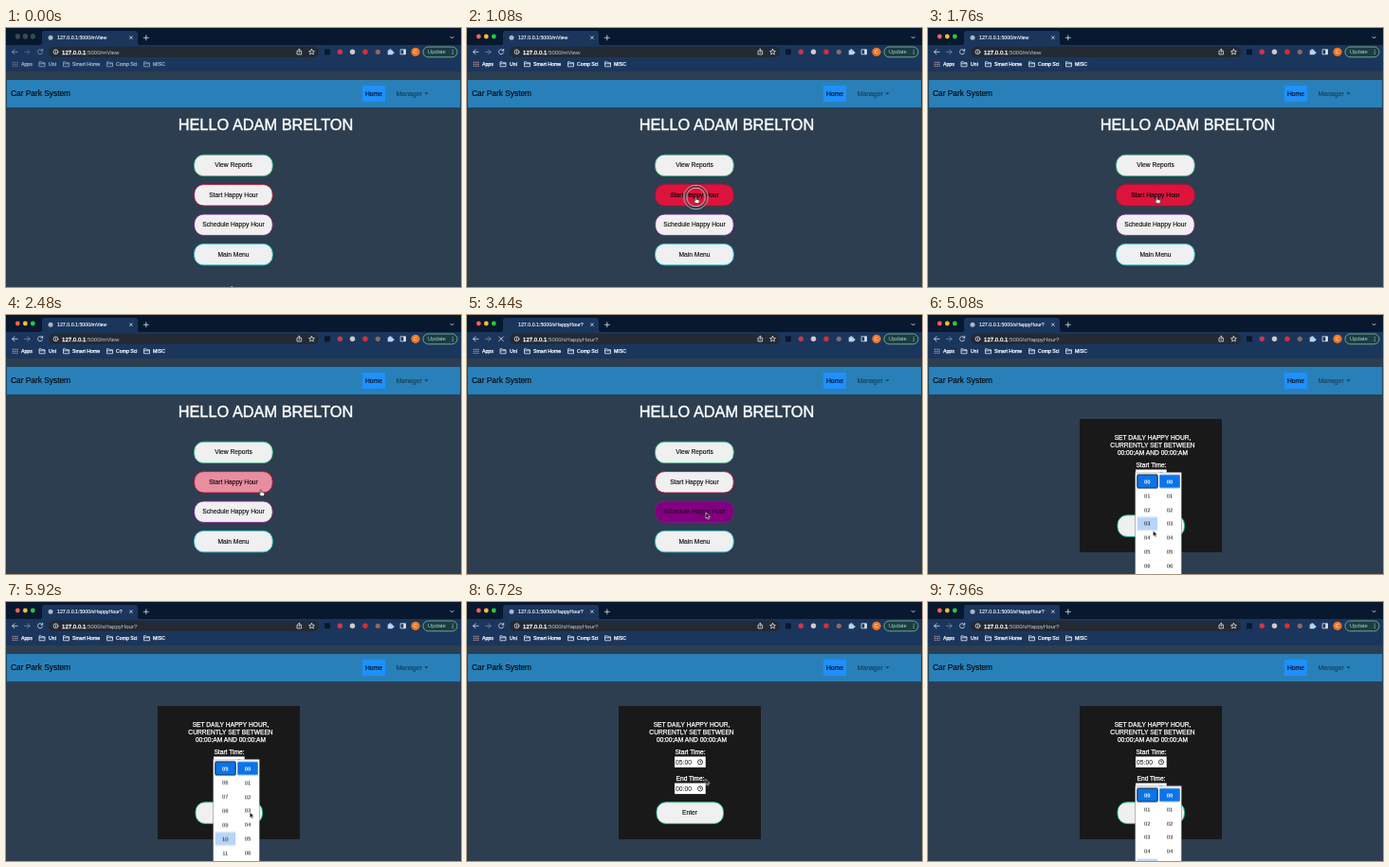
These frames come from a looping animation (480 px wide and 274 px high, 8 s). An HTML page:

```html
<!DOCTYPE html>
<html lang="en">
<head>
<meta charset="utf-8">
<title>Car Park System</title>
<style>
html, body { margin: 0; width: 100%; height: 100%; overflow: hidden; background: #2c3e50; }
svg { display: block; width: 100%; height: 100%; font-family: "Liberation Sans", Arial, sans-serif; }
.mid { text-anchor: middle; }
.line { fill: none; stroke: #dfe6ee; stroke-width: .8; stroke-linecap: round; }
.tab { font-size: 5.28px; fill: #f2f5f9; stroke: #f2f5f9; stroke-width: .15; }
.url { font-size: 6.08px; fill: #a9b0b8; stroke: #a9b0b8; stroke-width: .1; }
.url tspan { fill: #fff; stroke: #fff; stroke-width: .3; }
.marks { font-size: 5.2px; fill: #fff; stroke: #fff; stroke-width: .25; }
.heading { font-size: 16.35px; fill: #fff; stroke: #fff; stroke-width: .4; }
.button rect { fill: #f0f0f0; stroke-width: .9; }
.button text { font-size: 6.7px; text-anchor: middle; stroke: #000; stroke-width: .1; }
.card text { font-size: 6.65px; fill: #fff; stroke: #fff; stroke-width: .25; text-anchor: middle; }
.card .field text { font-size: 6.8px; fill: #111; stroke: none; text-anchor: start; }
.picker text { font-size: 5.9px; text-anchor: middle; fill: #111; }
.picker .chosen { font-weight: bold; fill: #fff; }

/* Hard switches */
.switch { animation: 8s step-end infinite; }
.inactive { animation-name: until12; }
.wakes { animation-name: wake; }
.before-nav { animation-name: until42; }
.after-nav { animation-name: from42; }
.loading { animation-name: loading; }
.idle { animation-name: idle; }
.menu-page { animation-name: until45; }
.form-page { animation-name: from45; }
.start-picker { animation-name: startPicker; }
.end-picker { animation-name: endPicker; }
.old-hour { animation-name: oldHour; }
.new-hour { animation-name: newHour; }
.hand { animation-name: hand; }
.arrow { animation-name: arrow; }
.press { animation-name: press; }
.start-hover { animation-name: startHover; }
.end-hover { animation-name: endHover; }
@keyframes until12 { 0% { opacity: 1 } 12%, 100% { opacity: 0 } }
@keyframes wake { 0% { opacity: .6 } 12%, 100% { opacity: 1 } }
@keyframes until42 { 0% { opacity: 1 } 42.5%, 100% { opacity: 0 } }
@keyframes from42 { 0% { opacity: 0 } 42.5%, 100% { opacity: 1 } }
@keyframes loading { 0% { opacity: 0 } 42.5% { opacity: 1 } 45%, 100% { opacity: 0 } }
@keyframes idle { 0% { opacity: 1 } 42.5% { opacity: 0 } 45%, 100% { opacity: 1 } }
@keyframes until45 { 0% { opacity: 1 } 45%, 100% { opacity: 0 } }
@keyframes from45 { 0% { opacity: 0 } 45%, 100% { opacity: 1 } }
@keyframes startPicker { 0% { opacity: 0 } 59% { opacity: 1 } 78%, 100% { opacity: 0 } }
@keyframes endPicker { 0% { opacity: 0 } 89%, 100% { opacity: 1 } }
@keyframes oldHour { 0% { opacity: 1 } 69.5%, 100% { opacity: 0 } }
@keyframes newHour { 0% { opacity: 0 } 69.5%, 100% { opacity: 1 } }
@keyframes hand { 0% { opacity: 0 } 4% { opacity: 1 } 42.5%, 100% { opacity: 0 } }
@keyframes arrow { 0% { opacity: 1 } 4% { opacity: 0 } 42.5%, 100% { opacity: 1 } }
@keyframes press {
  0% { opacity: 0 } 12% { opacity: 1 } 15% { opacity: 0 } 39.5% { opacity: 1 } 42% { opacity: 0 }
  57% { opacity: 1 } 59% { opacity: 0 } 69% { opacity: 1 } 71% { opacity: 0 }
  77% { opacity: 1 } 79% { opacity: 0 } 87% { opacity: 1 } 89%, 100% { opacity: 0 }
}
@keyframes startHover {
  0% { opacity: 0; transform: translateY(14.9px) }
  61% { opacity: 1; transform: translateY(14.9px) }
  62% { opacity: 1; transform: translateY(29.8px) }
  63% { opacity: 1; transform: translateY(44.7px) }
  65% { opacity: 1; transform: translateY(59.6px) }
  67%, 100% { opacity: 1; transform: translateY(74.5px) }
}
@keyframes endHover {
  0% { opacity: 0; transform: translateY(14.9px) }
  93% { opacity: 1; transform: translateY(14.9px) }
  95% { opacity: 1; transform: translateY(29.8px) }
  96.5% { opacity: 1; transform: translateY(44.7px) }
  98% { opacity: 1; transform: translateY(59.6px) }
  99%, 100% { opacity: 1; transform: translateY(74.5px) }
}

/* Continuous motion */
.main-fill { animation: mainFill 8s infinite; }
.start-fill { animation: startFill 8s infinite; }
.plan-fill { animation: planFill 8s infinite; }
.plan-label { animation: planLabel 8s infinite; }
.hours { animation: scrollHours 8s infinite; }
.pointer { animation: pointer 8s ease-in-out infinite; }
@keyframes mainFill { 0%, 4% { fill: #f0f0f0 } 6% { fill: #a8ecec } 10%, 100% { fill: #f0f0f0 } }
@keyframes startFill { 0%, 8.4% { fill: #f0f0f0 } 13%, 29.4% { fill: #dc143c } 34.4%, 100% { fill: #f0f0f0 } }
@keyframes planFill { 0%, 6.5% { fill: #f0f0f0 } 8.2% { fill: #c9a0c9 } 12%, 33% { fill: #f0f0f0 } 38%, 100% { fill: #800080 } }
@keyframes planLabel { 0%, 33% { opacity: 1 } 38%, 100% { opacity: .6 } }
@keyframes scrollHours { 0%, 69.5% { transform: none } 71.5%, 100% { transform: translateY(-74.5px) } }
@keyframes pointer {
  0%, 2% { transform: translate(238px, 273px) }
  10%, 22% { transform: translate(241.5px, 179px) }
  31% { transform: translate(269px, 185px) }
  37%, 45% { transform: translate(252px, 209px) }
  56%, 59% { transform: translate(246px, 168px) }
  63.5% { transform: translate(237.5px, 228px) }
  68%, 72% { transform: translate(238px, 248px) }
  76%, 79% { transform: translate(276px, 197px) }
  84% { transform: translate(251.5px, 187px) }
  87%, 90% { transform: translate(246px, 197px) }
  99.5%, 100% { transform: translate(237px, 277px) }
}
</style>
</head>
<body>
<svg viewBox="0 0 480 274" preserveAspectRatio="none">
  <defs>
    <path id="folder" fill="none" stroke="#e8edf3" stroke-width=".8" d="M0 0h2.2l.8 1h3v4H0zM0 2h6"/>
    <g id="clock" fill="none" stroke="#111" stroke-width=".8">
      <circle r="2.6"/><path d="M0-1.5V0H1.3"/>
    </g>
  </defs>

  <rect width="480" height="274" fill="#2c3e50"/>

  <!-- Browser frame -->
  <rect width="480" height="18" fill="#07182f"/>
  <rect y="18" width="480" height="28" fill="#1b365d"/>
  <path d="M36 18q2 0 2-3V6q0-3 3-3h95q3 0 3 3v9q0 3 2 3z" fill="#1b365d"/>
  <circle cx="12.3" cy="9" r="2.4" fill="#ff5f57"/><circle cx="20.3" cy="9" r="2.4" fill="#febc2e"/><circle cx="28.3" cy="9" r="2.4" fill="#28c840"/>
  <g class="switch inactive" fill="#3a4655"><circle cx="12.3" cy="9" r="2.5"/><circle cx="20.3" cy="9" r="2.5"/><circle cx="28.3" cy="9" r="2.5"/></g>
  <circle class="switch idle" cx="47" cy="10.3" r="2.5" fill="#aab6c5"/>
  <g class="tab">
    <text class="switch before-nav" x="54" y="12.2">127.0.0.1:5000/mView</text>
    <text class="switch after-nav" x="54" y="12.2">127.0.0.1:5000/sHappyHour?</text>
  </g>
  <path class="line" d="M130.5 8.8l2.8 2.8m0-2.8l-2.8 2.8M145.3 10.3h5m-2.5-2.5v5M469 9.3l1.6 1.7 1.6-1.7"/>

  <g class="switch wakes">
    <path class="line" d="M12 25.3H6.5m2.5-2.5l-2.5 2.5 2.5 2.5"/>
    <path class="line" opacity=".5" d="M19.5 25.3H25m-2.5-2.5l2.5 2.5-2.5 2.5"/>
    <path class="line switch idle" d="M38.3 23.8a2.6 2.6 0 1 0 .3 2.2M38.7 22.3v1.8h-1.8"/>
    <path class="line switch loading" d="M33.8 23l4.5 4.5m0-4.5l-4.5 4.5"/>
  </g>
  <rect x="45" y="19.7" width="285" height="11.4" rx="5.7" fill="#232a33"/>
  <g class="line"><circle cx="52.5" cy="25.3" r="2.4"/><path d="M52.5 25.2v1.2m0-2.4v.1"/></g>
  <g class="url">
    <text class="switch before-nav" x="59" y="27.5"><tspan>127.0.0.1</tspan>:5000/mView</text>
    <text class="switch after-nav" x="59" y="27.5"><tspan>127.0.0.1</tspan>:5000/sHappyHour?</text>
  </g>
  <path class="line" d="M308 24.3h-1v3.6h4.6v-3.6h-1M309.3 26v-3.8m-1.1 1.1l1.1-1.1 1.1 1.1"/>
  <path class="line" d="M322.5 22.4l.9 1.9 2 .2-1.5 1.4.4 2-1.8-1.1-1.8 1.1.4-2-1.5-1.4 2-.2z"/>
  <rect x="336" y="22.3" width="6" height="6" fill="#0a1730"/>
  <circle cx="352.3" cy="25.3" r="2.7" fill="#c8394c"/>
  <circle cx="365.5" cy="25.3" r="2.7" fill="#cfc9cc"/>
  <circle cx="379" cy="25.3" r="2.7" fill="#d8302f"/>
  <circle cx="392.3" cy="25.3" r="2.6" fill="#8c6a66"/>
  <path fill="#b9d2f0" d="M402.7 23.6h1.6a1.1 1.1 0 1 1 2.1 0h1.5v1.5a1.1 1.1 0 1 1 0 2v1.2h-5.2z"/>
  <path class="line" d="M416.5 22.8h5v5h-5z"/><path fill="#dfe6ee" d="M419.3 22.8h2.2v5h-2.2z"/>
  <circle cx="432" cy="25.3" r="4.6" fill="#ee7623"/>
  <text class="mid" x="432" y="27.2" font-size="5.3" fill="#fff">C</text>
  <rect x="440" y="20" width="36" height="10.8" rx="5.4" fill="#1d3a45" stroke="#7fc896" stroke-width=".8"/>
  <text x="445" y="27.4" font-size="5.8" fill="#a4e0b4">Update</text>
  <path d="M471.2 23.2v.1m0 2v.1m0 2v.1" stroke="#a4e0b4" stroke-width="1.1" stroke-linecap="round"/>

  <g class="switch wakes">
    <path d="M6.8 36.3h5.6m-5.6 2h5.6m-5.6 2h5.6" stroke="#c99a9a" stroke-width="1.2" stroke-dasharray="1.2 1"/>
    <use href="#folder" x="35" y="35.8"/><use href="#folder" x="60.5" y="35.8"/>
    <use href="#folder" x="106.5" y="35.8"/><use href="#folder" x="145.5" y="35.8"/>
    <g class="marks">
      <text x="16" y="40.2">Apps</text><text x="45" y="40.2">Uni</text><text x="70" y="40.2">Smart Home</text>
      <text x="116" y="40.2">Comp Sci</text><text x="155" y="40.2">MISC</text>
    </g>
  </g>

  <!-- Site header -->
  <rect x=".5" y="54.5" width="479" height="30" fill="#2980b9" stroke="#20465f" stroke-width="1"/>
  <text x="5" y="72" font-size="8.35" stroke="#000" stroke-width=".1">Car Park System</text>
  <rect x="376" y="61" width="24" height="17" fill="#1e90ff"/>
  <text class="mid" x="388" y="71.8" font-size="6.8" stroke="#000" stroke-width=".1">Home</text>
  <g fill="#14405c"><text x="411.5" y="71.8" font-size="6.95" stroke="#14405c" stroke-width=".15">Manager</text><path d="M441.3 68.3h4.4l-2.2 2.2z"/></g>

  <g class="switch menu-page">
    <text class="mid heading" x="274" y="108.2">HELLO ADAM BRELTON</text>
    <g class="button">
      <rect x="198.6" y="134.2" width="82.6" height="22.4" rx="9.8" stroke="#45c08c"/><text x="240" y="147.4">View Reports</text>
      <rect class="start-fill" x="198.6" y="165.6" width="82.6" height="22.4" rx="9.8" stroke="#b01238"/><text x="240" y="178.9">Start Happy Hour</text>
      <rect class="plan-fill" x="198.6" y="197" width="82.6" height="22.4" rx="9.8" stroke="#7d1c86"/><text class="plan-label" x="240" y="210.3">Schedule Happy Hour</text>
      <rect class="main-fill" x="198.6" y="228.4" width="82.6" height="22.4" rx="9.8" stroke="#2ad0d8"/><text x="240" y="241.7">Main Menu</text>
    </g>
  </g>

  <g class="switch form-page">
    <g class="card">
      <rect x="160" y="110" width="150" height="141" fill="#191919"/>
      <text x="237" y="132.4">SET DAILY HAPPY HOUR,</text>
      <text x="237" y="140.4">CURRENTLY SET BETWEEN</text>
      <text x="237" y="148.4">00:00:AM AND 00:00:AM</text>
      <text x="235.5" y="160.6">Start Time:</text>
      <text x="235.5" y="188.8">End Time:</text>
      <g class="field">
        <rect x="219" y="163.5" width="32.7" height="11.5" fill="#fff"/>
        <text class="switch old-hour" x="220" y="171.7">00:00</text>
        <text class="switch new-hour" x="220" y="171.7">05:00</text>
        <use href="#clock" x="246" y="169.3"/>
        <rect x="219" y="191.6" width="32.7" height="11.5" fill="#fff"/>
        <text x="220" y="199.8">00:00</text>
        <use href="#clock" x="246" y="197.4"/>
      </g>
    </g>
    <g class="button">
      <rect x="200" y="211.8" width="70.5" height="22.6" rx="9.8" stroke="#1abc9c"/><text x="235" y="225.4">Enter</text>
    </g>
  </g>

  <clipPath id="listArea"><rect x="219" y="1.5" width="48" height="130"/></clipPath>
  <g class="switch start-picker" transform="translate(0 166.5)"><g class="picker" data-picks="00 05" data-hover="start-hover"></g></g>
  <g class="switch end-picker" transform="translate(0 194.6)"><g class="picker" data-picks="00" data-hover="end-hover"></g></g>

  <g class="pointer">
    <g class="switch press" fill="none">
      <circle r="11.4" stroke="#222" stroke-width="2.6" opacity=".55"/>
      <circle r="12.7" stroke="#eee" stroke-width=".7"/><circle r="9.9" stroke="#eee" stroke-width=".8"/>
    </g>
    <path class="switch hand" fill="#fff" stroke="#111" stroke-width=".6" stroke-linejoin="round"
      d="M-.8 0q.8-.8 1.4 0v2.3l2.6.6q.8.3.6 1.2L3.3 6.6H-.1L-2.2 4q0-1 1.4-.3z"/>
    <path class="switch arrow" fill="#000" stroke="#fff" stroke-width=".6" stroke-linejoin="round"
      d="M0 0v6.2l1.4-1.2 1 2.1 1.1-.5-1-2h1.9z"/>
  </g>
</svg>
<script>
const pitch = 14.9;
const pad = n => String(n).padStart(2, "0");
const list = (x, limit) => Array.from({ length: 16 }, (_, i) =>
  `<text x="${x}" y="${11.7 + i * pitch}">${pad(i % limit)}</text>`).join("");

for (const picker of document.querySelectorAll(".picker")) {
  const { picks, hover } = picker.dataset;
  const [first, second] = picks.split(" ");
  const label = (text, state) => `<text class="chosen ${state}" x="231.3" y="11.7">${text}</text>`;
  picker.innerHTML = `
    <rect x="218.7" width="48.6" height="130" fill="#fff" stroke="#777" stroke-width=".5"/>
    <rect class="switch ${hover}" x="220.8" y="2.4" width="21.4" height="14.2" rx="1" fill="#b8d4f8"/>
    <g clip-path="url(#listArea)">
      <g class="${second ? "hours" : ""}">${list(231.3, 24)}</g>${list(255, 60)}
    </g>
    <rect x="220.8" y="2.4" width="21.4" height="14.2" rx="1" fill="#0b74e8" stroke="#10243f" stroke-width="1"/>
    <rect x="244.2" y="2.4" width="21.6" height="14.2" rx="1" fill="#0b74e8"/>
    ${second ? label(first, "switch old-hour") + label(second, "switch new-hour") : label(first, "")}
    <text class="chosen" x="255" y="11.7">00</text>`;
}
</script>
</body>
</html>
```
